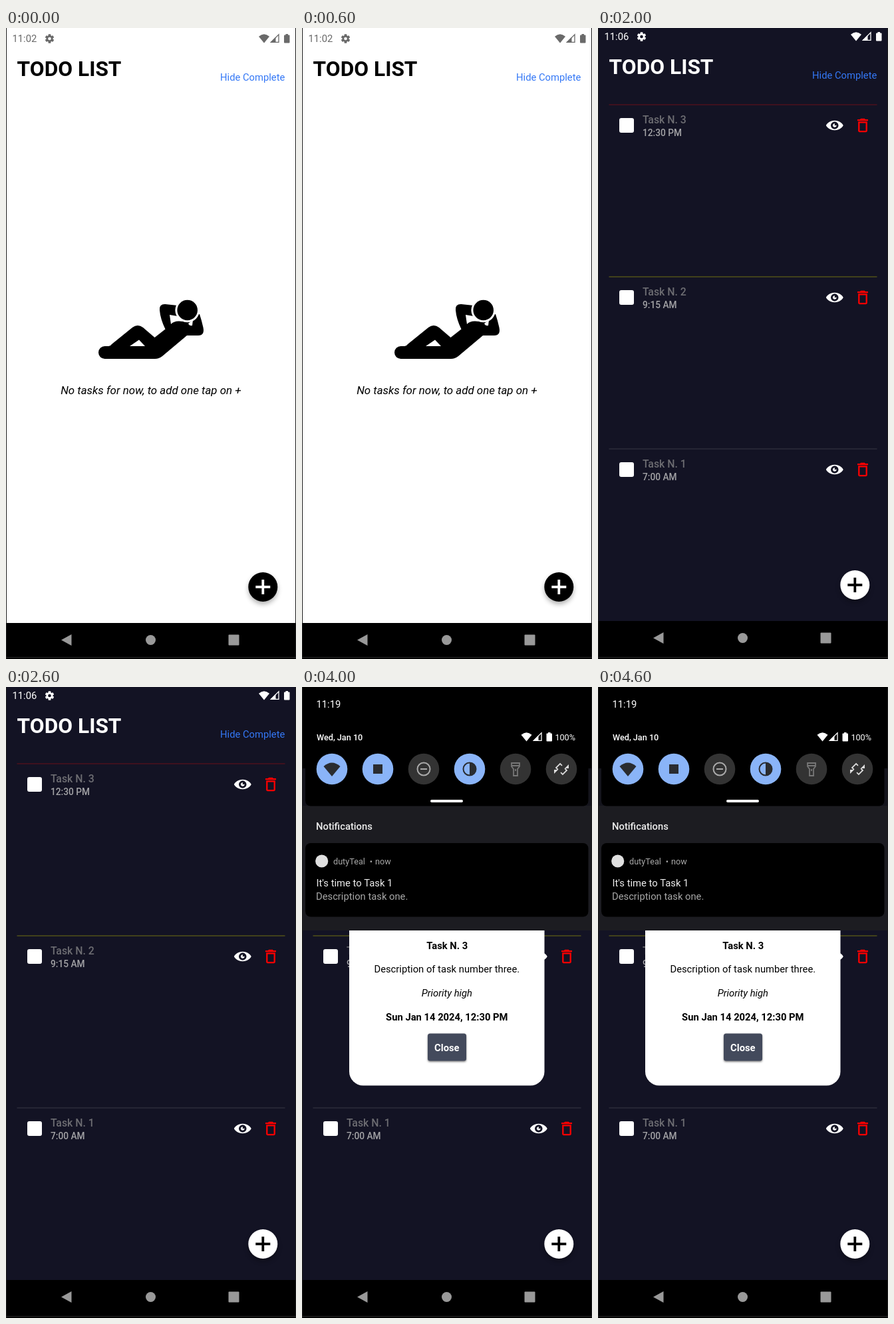
Animation of 436 by 946 pixels, one loop 5 s. Source, as an HTML page with a canvas:

```html
<!DOCTYPE html>
<html lang="en">
<head>
<meta charset="utf-8">
<title>Todo app</title>
<style>
html, body { margin: 0; width: 100%; height: 100%; overflow: hidden; background: #000; }
canvas { display: block; width: 436px; height: 946px; }
</style>
</head>
<body>
<canvas id="stage" width="436" height="946"></canvas>
<script>
const g = document.getElementById('stage').getContext('2d');
const W = 436, H = 946, STEP = 1000, DP = 1.056;
const NIGHT = '#131324';

const EYE = new Path2D('M10 4.4C3.44 4.4 0 9.23 0 10c0 .77 3.44 5.6 10 5.6 6.56 0 10-4.83 10-5.6 0-.77-3.44-5.6-10-5.6z' +
  'm0 9.9c-2.46 0-4.45-1.93-4.45-4.3S7.55 5.7 10 5.7s4.44 1.93 4.44 4.3-1.99 4.3-4.44 4.3z' +
  'M10 10c-.4-.45.66-2.15 0-2.15-1.23 0-2.22.96-2.22 2.15s1 2.15 2.22 2.15c1.23 0 2.22-.96 2.22-2.15 0-.55-1.88.38-2.22 0z');
const BIN = new Path2D('M6 19c0 1.1.9 2 2 2h8c1.1 0 2-.9 2-2V7H6zM8 9h8v10H8zM15.5 4l-1-1h-5l-1 1H5v2h14V4z');
const BODY = new Path2D('M148.500 477H154.500Q157 477 159 474L190 449Q198 443 206 449L223.500 464L239.500 451.500Q232 436 231 423' +
  'Q230 414 239 414L258 416L262 432L291 429Q294 438 296.500 449Q299 461 289 461H272L235 492Q230 496 224 496H148.500A9.500 9.500 0 0 1 148.500 477Z' +
  'M186 477H209L200 467.500Z M246 430L258 432L266 440Q253 438 248 444Z M274 443L281 438L280 446Q276 447 274 443Z');

function rect(x, y, w, h, color, r = 0) {
  g.fillStyle = color;
  g.beginPath();
  g.roundRect(x, y, w, h, r);
  g.fill();
}

function disc(x, y, r, color) {
  g.fillStyle = color;
  g.beginPath();
  g.arc(x, y, r, 0, 7);
  g.fill();
}

function poly(color, ...p) {
  g.fillStyle = color;
  g.beginPath();
  for (let i = 0; i < p.length; i += 2) g.lineTo(p[i], p[i + 1]);
  g.closePath();
  g.fill();
}

function text(s, x, y, dp, color, style = '400', align = 'left') {
  g.font = `${style} ${dp * DP}px Roboto, "Noto Sans", sans-serif`;
  g.fillStyle = color;
  g.textAlign = align;
  g.fillText(s, x, y);
}

function icon(path, cx, cy, box, scale, color) {
  g.save();
  g.translate(cx, cy);
  g.scale(scale, scale);
  g.translate(-box / 2, -box / 2);
  g.fillStyle = color;
  g.fill(path, 'evenodd');
  g.restore();
}

function shadow(color, blur, dy) {
  g.shadowColor = color;
  g.shadowBlur = blur;
  g.shadowOffsetY = dy;
}

function noShadow() { shadow('transparent', 0, 0); }

function wifi(x, y, size, color) {
  const h = size * .8;
  g.fillStyle = color;
  g.beginPath();
  g.moveTo(x, y + h / 2);
  g.lineTo(x - size / 2, y - h / 4);
  g.quadraticCurveTo(x, y - h * .8, x + size / 2, y - h / 4);
  g.fill();
}

function signal(x, y, color) {
  poly(color, x, y, x + 8.5, y, x + 8.5, y - 8.5);
  g.strokeStyle = color;
  g.lineWidth = 1.3;
  g.beginPath();
  g.moveTo(x + 1.5, y - .7);
  g.lineTo(x + 13, y - .7);
  g.lineTo(x + 13, y - 12.2);
  g.closePath();
  g.stroke();
}

function battery(x, y, color) {
  rect(x, y - 11.5, 8.5, 12, color, 1);
  rect(x + 2.5, y - 13, 3.5, 2, color);
}

function gear(x, y, color, bg) {
  disc(x, y, 5, color);
  for (let i = 0; i < 6; i++) {
    g.save();
    g.translate(x, y);
    g.rotate(i * Math.PI / 3);
    rect(-1.9, -6.7, 3.8, 4, color, .5);
    g.restore();
  }
  disc(x, y, 2.3, bg);
}

function statusBar(time, y, color, bg) {
  text(time, 9.5, y + 5, 14, color);
  gear(65.5, y, color, bg);
  wifi(388, y, 16, color);
  signal(397, y + 6, color);
  battery(418, y + 6, color);
}

function navBar(top) {
  const y = top + 25.5;
  rect(0, top, W, H - top, '#000');
  poly('#999', 83, y, 98.5, y - 8.5, 98.5, y + 8.5);
  disc(217.5, y, 7.5, '#999');
  rect(334.5, y - 8, 16, 16, '#999', 1);
}

function edges() {
  rect(0, 0, 1, H, '#1c1c1c');
  rect(435, 0, 1, H, '#1c1c1c');
  rect(0, 943, W, 1, '#2a2a2a');
}

function addButton(y, fill, ink) {
  shadow('rgba(0,0,0,.3)', 7, 4);
  disc(386.3, y, 22, fill);
  noShadow();
  rect(375.3, y - 1.9, 22, 3.8, ink);
  rect(384.4, y - 11, 3.8, 22, ink);
}

function header(y, color) {
  text('TODO LIST', 16.6, y, 30, color, '700');
  text('Hide Complete', 419.3, y + 7, 14, '#3478f6', '400', 'right');
}

function emptyList() {
  rect(0, 0, W, H, '#fff');
  statusBar('11:02', 16, '#6a6a6a', '#fff');
  header(72, '#000');
  g.fillStyle = '#000';
  g.fill(BODY, 'evenodd');
  disc(272.7, 423, 18.3, '#fff');
  disc(272.7, 423, 15.3, '#000');
  text('No tasks for now, to add one tap on +', 217.8, 549, 16, '#000', 'italic 400', 'center');
  addButton(838, '#000', '#fff');
  navBar(892);
}

function formButton(label, x, y, w, fill, ink, style) {
  rect(x, y, w, 42, '#000', 2.5);
  if (fill) rect(x + 2, y + 2, w - 4, 38, fill, 1);
  text(label, x + w / 2, y + 27, 14, ink, style, 'center');
}

function form() {
  rect(0, 0, W, H, '#fff');
  statusBar('11:08', 15, '#6a6a6a', '#fff');
  text('Add Todo', 22, 94, 33.7, '#000', '700');
  rect(22, 119, 391, 1, '#ececec');
  const labels = { Name: 179, Description: 279, Hour: 387, Date: 482, Priority: 585, Alert: 661 };
  for (const s in labels) text(s, s === 'Alert' ? 22 : 21, labels[s], 20.3, '#000', '500');

  text('Task N. 1', 158.7, 178, 14, '#000');
  rect(159, 186, 254, 1, '#c8c8c8');
  text('Description task number one.', 158, 278, 14, '#000');
  rect(159, 316, 254, 1, '#c8c8c8');
  text('06:00', 155.3, 386.5, 15, '#000', '500');
  text('Thu Jan 25 2024', 117, 481.5, 15, '#000', '500');

  formButton('SELECT HOUR', 294, 359, 109, '', '#fff', '700');
  formButton('SELECT DATE', 298, 454, 105, '', '#fff', '700');
  formButton('LOW', 189, 557.5, 43.5, '', '#0a9a0a', '400');
  formButton('REGULAR', 253.5, 557.5, 76.5, '', '#f5a623', '400');
  formButton('HIGH', 351, 557.5, 52, '#cc0000', '#000', '400');

  text('You will receive an alert at the time you set', 22, 681, 12, '#ccc');
  text('for this reminder', 22, 695.5, 12, '#ccc');
  rect(375, 663, 30, 15, '#35c91f', 7.5);
  shadow('rgba(0,0,0,.35)', 3, 1.5);
  disc(399.5, 670.5, 10.7, '#ececec');
  noShadow();

  rect(41, 752, 157, 48, '#000', 11);
  text('Cancel', 119.5, 784, 20, '#f00', '700', 'center');
  rect(237, 752, 157, 48, '#000', 11);
  text('Done', 315.5, 784, 20, '#fff', '700', 'center');
  navBar(891);
}

function task(n, time, y, line) {
  rect(16.5, y - .7, 403, 1.5, line);
  rect(32, y + 20, 22, 22, '#fff', 3);
  text('Task N. ' + n, 67, y + 28, 15, '#6d6d72', '500');
  text(time, 67, y + 47, 13, '#a3a3a6', '500');
  icon(EYE, 355.8, y + 31, 20, 1.29, '#fff');
  icon(BIN, 398, y + 31, 24, 1.14, '#f00');
}

function nightList() {
  rect(0, 0, W, H, NIGHT);
  statusBar('11:06', 13, '#fff', NIGHT);
  header(69, '#fff');
  task(3, '12:30 PM', 115, '#4c101c');
  task(2, '9:15 AM', 373, '#505019');
  task(1, '7:00 AM', 631, '#2b2b3a');
  addButton(835, '#fff', '#000');
  navBar(889);
}

function dialog() {
  const mid = 217.8;
  rect(71, 340, 293.5, 257.5, '#fff', 21);
  text('Task N. 3', mid + .5, 392.5, 14, '#000', '700', 'center');
  text('Description of task number three.', mid, 428, 14, '#000', '400', 'center');
  text('Priority high', mid, 464, 14, '#000', 'italic 400', 'center');
  text('Sun Jan 14 2024, 12:30 PM', mid, 499.5, 14, '#000', '700', 'center');
  shadow('rgba(0,0,0,.5)', 3, 1.5);
  rect(189, 519.5, 58, 41, '#434a5c', 3.5);
  noShadow();
  text('Close', mid, 546, 14, '#fff', '700', 'center');
}

function ring(x, y, r, color) {
  g.strokeStyle = color;
  g.lineWidth = 2;
  g.beginPath();
  g.arc(x, y, r, 0, 7);
  g.stroke();
}

function tiles() {
  const y = 123, ink = '#2a2c30';
  for (let i = 0; i < 6; i++) disc(45 + i * 69, y, 23.3, i === 0 || i === 1 || i === 3 ? '#8ab4f8' : '#333');
  wifi(45, y + 1, 25, ink);
  rect(107, y - 7, 14, 14, ink);
  ring(183, y, 9.5, '#aaa');
  rect(178, y - 1, 10, 2, '#aaa');
  ring(252, y, 9.5, ink);
  g.fillStyle = ink;
  g.beginPath();
  g.arc(252, y, 9.5, -Math.PI / 2, Math.PI / 2);
  g.fill();

  // torch
  g.strokeStyle = '#777';
  g.lineWidth = 1.8;
  g.stroke(new Path2D('M315 114H327V119L324 123V133H318V123L315 119ZM315 118H327M321 123V126'));

  // rotate
  g.save();
  g.translate(390, y);
  g.strokeStyle = '#ddd';
  g.rotate(-Math.PI / 4);
  g.strokeRect(-4.3, -7, 8.6, 14);
  rect(-6, -3, 3, 6, '#333');
  rect(3, -3, 3, 6, '#333');
  g.restore();
  poly('#ddd', 379, 124, 385, 124, 379, 130);
  poly('#ddd', 401, 122, 395, 122, 401, 116);
}

function shade() {
  rect(0, 0, W, 365, '#1c1c21');
  rect(0, 0, W, 122, '#000');
  rect(0, 122, W, 56, '#14141c');
  rect(5, 100, 425.5, 78.5, '#000', 8);
  text('11:19', 21.5, 31, 14, '#fff');
  text('Wed, Jan 10', 22, 80, 12, '#fff', '500');
  wifi(337.5, 75, 16, '#fff');
  signal(347, 81, '#fff');
  battery(367.5, 81, '#fff');
  text('100%', 411, 80, 12, '#fff', '400', 'right');
  tiles();
  rect(193, 169, 49, 4, '#fff', 2);
  text('Notifications', 21, 214, 14, '#eee', '500');
  rect(5, 234, 425.5, 110.5, '#000', 8);
  disc(29.7, 261, 9.6, '#e0e0e0');
  text('dutyTeal', 47, 266, 12, '#a8a8a8');
  text('•', 104, 266, 12, '#a8a8a8', '400', 'center');
  text('now', 110, 266, 12, '#a8a8a8');
  text("It's time to Task 1", 21.5, 298.5, 14, '#eee');
  text('Description task one.', 21, 319, 14, '#a8a8a8');
}

const scenes = [
  [emptyList],
  [form],
  [nightList],
  [nightList, dialog],
  [nightList, dialog, shade]
];

let start;
function tick(now) {
  start ??= now;
  const i = Math.floor((now - start) / STEP) % scenes.length;
  for (const draw of scenes[i]) draw();
  edges();
  requestAnimationFrame(tick);
}
requestAnimationFrame(tick);
</script>
</body>
</html>
```
